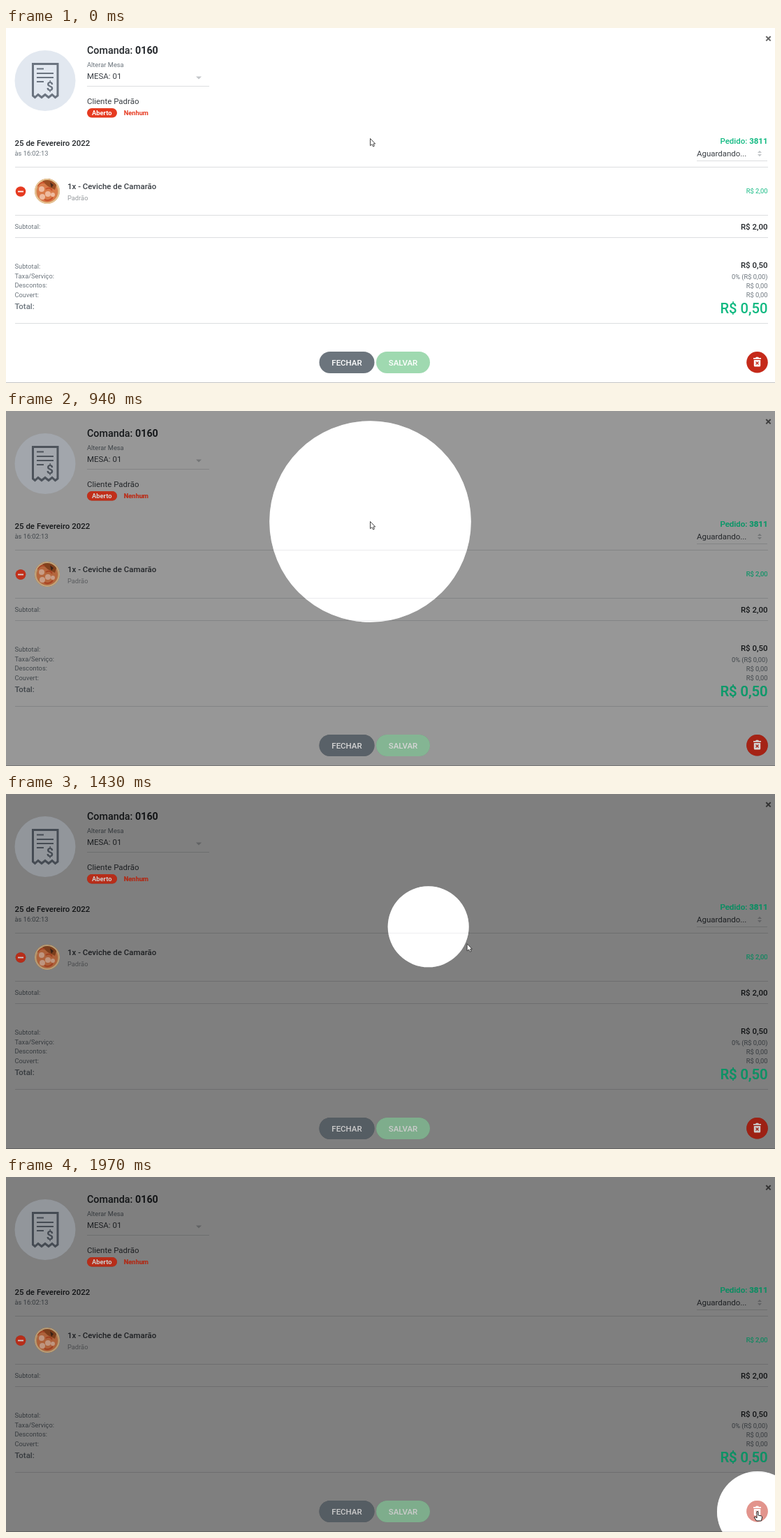
An HTML page that plays this animation: 1101x509 px, repeating every 2090 ms.

```html
<!DOCTYPE html>
<html lang="pt-BR">
<head>
<meta charset="utf-8">
<title>Comanda</title>
<style>
  html, body { margin: 0; width: 100%; height: 100%; overflow: hidden; background: #fff; }
  svg { display: block; font-family: Roboto, sans-serif; }
  text { font-size: 9.3px; fill: #6c757d; }
  .md { font-size: 11.47px; fill: #3a3f45; }
  .lg { font-size: 14.34px; fill: #24282c; }
  .xl { font-size: 20.2px; }
  .w5 { font-weight: 500; }
  .w7, .w7 text { font-weight: 700; }
  .dark { fill: #212529; }
  .pale { fill: #979b9f; }
  .green { fill: #10b981; }
  .white { fill: #fff; }
  .red { fill: #e63a20; }
  .end { text-anchor: end; }
  .mid { text-anchor: middle; }
</style>
</head>
<body>
<svg width="1101" height="509" viewBox="0 0 1101 509">
  <rect width="1101" height="509" fill="#fff"/>

  <g stroke="#dcdee0" fill="none">
    <path d="M13 199.5H1091M13 268.5H1091M13 300.5H1091M13 423.5H1091"/>
    <path d="M116 83.5H291M989 190.5H1090"/>
    <path d="M0 508.5H1101" stroke="#c4c4c4"/>
  </g>
  <path d="M272 69.500h8l-4 4z" fill="#c3c6c9"/>
  <path d="M1076 179l3-3.200 3 3.200zM1076 181l3 3.200 3-3.200z" fill="#c3c6c9"/>
  <path d="M1088.300 12l6.400 6.400M1094.700 12l-6.400 6.400" stroke="#666" stroke-width="2"/>

  <text class="lg w5" x="116" y="36.500">Comanda: <tspan class="w7">0160</tspan></text>
  <text x="116" y="56.300">Alterar Mesa</text>
  <text class="md" x="116" y="73.300">MESA: 01</text>
  <text class="md" x="116" y="108.500">Cliente Padrão</text>
  <text class="md w5 dark" x="12.500" y="168.800">25 de Fevereiro 2022</text>
  <text x="12.500" y="183.300">às 16:02:13</text>
  <text class="md" x="989" y="183.500">Aguardando...</text>
  <text class="md w5" x="88" y="231.300">1x - Ceviche de Camarão</text>
  <text class="pale" x="88" y="247">Padrão</text>
  <text x="12.500" y="287.500">Subtotal:</text>
  <text class="md w5 dark end" x="1090.500" y="289">R$ 2,00</text>
  <text x="12.500" y="345.200">Subtotal:</text>
  <text x="12.500" y="359">Taxa/Serviço:</text>
  <text x="12.500" y="372.400">Descontos:</text>
  <text x="12.500" y="385.800">Couvert:</text>
  <text class="md w5" style="fill:#6c757d" x="12.500" y="403">Total:</text>
  <text class="md w5 dark end" x="1090.500" y="344">R$ 0,50</text>
  <text class="end" x="1090.500" y="359.500">0% (R$ 0,00)</text>
  <text class="end" x="1090.500" y="373">R$ 0,00</text>
  <text class="end" x="1090.500" y="386.300">R$ 0,00</text>

  <g id="receipt">
    <circle cx="56" cy="75.500" r="43.500" fill="#e2e8f0"/>
    <g fill="none" stroke="#6b7480" stroke-width="3">
      <path d="M38.500 97V51.500H74V97l-3.500 2.500-4.500-4-5 4-5-4-5 4-5-4-4.500 4z"/>
      <path d="M44 58.500H54M44 65H68M44 71H68M44 77H54" stroke-width="2.200"/>
    </g>
    <text class="mid w7" style="font-size:18px;fill:#6b7480" x="63" y="90">$</text>
  </g>

  <g id="vivid">
    <rect class="red" x="116" y="115" width="43" height="13.500" rx="6.750"/>
    <g class="w7">
      <text class="white mid" x="137.300" y="125">Aberto</text>
      <text class="red mid" x="186.300" y="125">Nenhum</text>
    </g>
    <text class="md w5 green end" x="1090.500" y="165.800">Pedido: <tspan class="w7">3811</tspan></text>
    <text class="green end" x="1090.500" y="237.300">R$ 2,00</text>
    <text class="xl w5 green end" x="1090.500" y="409.300">R$ 0,50</text>

    <circle class="red" cx="21" cy="234.500" r="7.300"/>
    <path d="M17 234.500h8" stroke="#fff" stroke-width="1.800"/>

    <clipPath id="plate"><circle cx="59" cy="234" r="18"/></clipPath>
    <g clip-path="url(#plate)">
      <path d="M41 216h36v36h-36z" fill="#d9a06c"/>
      <circle cx="59" cy="235" r="15" fill="#d97b4a"/>
      <path d="M50 218l12-2 11 7-3 9-10-5z" fill="#9c4f24"/>
      <path d="M63 221l5 4-3 4z" fill="#4a2a1d"/>
      <g fill="#eebba0">
        <circle cx="51" cy="231" r="4"/><circle cx="60" cy="238" r="4"/>
        <circle cx="52" cy="242" r="4"/><circle cx="67" cy="239" r="3"/>
      </g>
      <path d="M45 227q5-7 10-5M57 231q6-4 9 2M55 246q7 3 12-3" fill="none" stroke="#c8502b" stroke-width="2"/>
      <circle cx="59" cy="234" r="17" fill="none" stroke="#e5c596" stroke-width="2"/>
    </g>

    <rect x="448.500" y="464" width="79" height="31" rx="15.500" fill="#6c757d"/>
    <rect x="530" y="464" width="77" height="31" rx="15.500" fill="#9fd9b0"/>
    <text class="md w5 white mid" x="488" y="483.500">FECHAR</text>
    <text class="md w5 white mid" x="568.500" y="483.500">SALVAR</text>

    <circle cx="1075.500" cy="479.300" r="15.300" fill="#c52a1a"/>
    <path class="white" d="M1070 473h3l1-1.200h3l1 1.200h3v1.800h-11zM1070.800 476h9.400v8q0 1.500-1.500 1.500h-6.400q-1.500 0-1.500-1.500z"/>
    <path d="M1073.500 478.500l4 4M1077.500 478.500l-4 4" stroke="#c52a1a" stroke-width="1.300"/>
  </g>

  <path id="shade" fill-rule="evenodd"/>
  <use id="receiptGlow" href="#receipt" opacity=".3"/>
  <use id="vividGlow" href="#vivid" opacity=".6"/>
  <circle id="spot" fill="#fff"/>

  <path id="arrow" d="M0 0V10.200L2.500 8.200 4.200 11.500 5.900 10.700 4.400 7.500H7.200Z" fill="#fff" stroke="#333" stroke-width=".9"/>
  <path id="hand" d="M-1 0Q0-1.300 1 0V5L5.500 6Q6.600 6.400 6.500 8L5.500 13H-1.500L-4.800 8Q-4.500 6.500-2.800 7.500L-1 9Z" fill="#fff" stroke="#222" stroke-width="1"/>
</svg>
<script>
const LOOP = 2090, START = [521.5, 158.5], END = [1076, 480];
const RADIUS = 58, ZOOM = 9, MAX_SHADE = .5;

// [time in ms, progress], each value held until the next one
const closing = [[0, 0], [790, .097], [880, .413], [940, .814], [1010, .893],
  [1080, .945], [1150, .977], [1220, .993], [1290, 1]];
const travel = [[0, 0], [1350, .04], [1420, .15], [1490, .35], [1560, .58],
  [1640, .773], [1710, .87], [1780, .935], [1840, .97], [1900, .988], [1970, 1]];

const $ = id => document.getElementById(id);
const stepAt = (steps, t) => steps.findLastIndex(([at]) => t >= at);

function pointAt(p) {
  const bent = p - .4 * p * (1 - p);
  return [START[0] + (END[0] - START[0]) * p, START[1] + (END[1] - START[1]) * bent];
}

function draw(t) {
  const close = closing[stepAt(closing, t)][1];
  const radius = RADIUS * (ZOOM - (ZOOM - 1) * close);
  const alpha = MAX_SHADE * close;

  const i = stepAt(travel, t);
  const p = travel[i][1];
  const next = i ? (travel[i + 1] || travel[i])[1] : p;
  const [x, y] = pointAt(p);
  const [cx, cy] = pointAt((p + next) / 2); // the pointer runs ahead of the spotlight

  $('shade').setAttribute('d', `M0 0H1101V509H0ZM${x - radius} ${y}` +
    `a${radius} ${radius} 0 1 0 ${2 * radius} 0a${radius} ${radius} 0 1 0 ${-2 * radius} 0Z`);
  $('shade').setAttribute('opacity', alpha);

  const spot = { cx: x, cy: y, r: radius, opacity: alpha };
  for (const key in spot) $('spot').setAttribute(key, spot[key]);

  for (const id of ['receiptGlow', 'vividGlow']) $(id).style.display = close ? '' : 'none';

  const overButton = Math.hypot(cx - 1075.5, cy - 479.3) < 15;
  $('arrow').style.display = overButton ? 'none' : '';
  $('hand').style.display = overButton ? '' : 'none';
  $('arrow').setAttribute('transform', `translate(${cx} ${cy})`);
  $('hand').setAttribute('transform', `translate(${cx} ${cy})`);
}

const began = performance.now();
function tick() {
  draw((performance.now() - began) % LOOP);
  requestAnimationFrame(tick);
}
tick();
</script>
</body>
</html>
```
